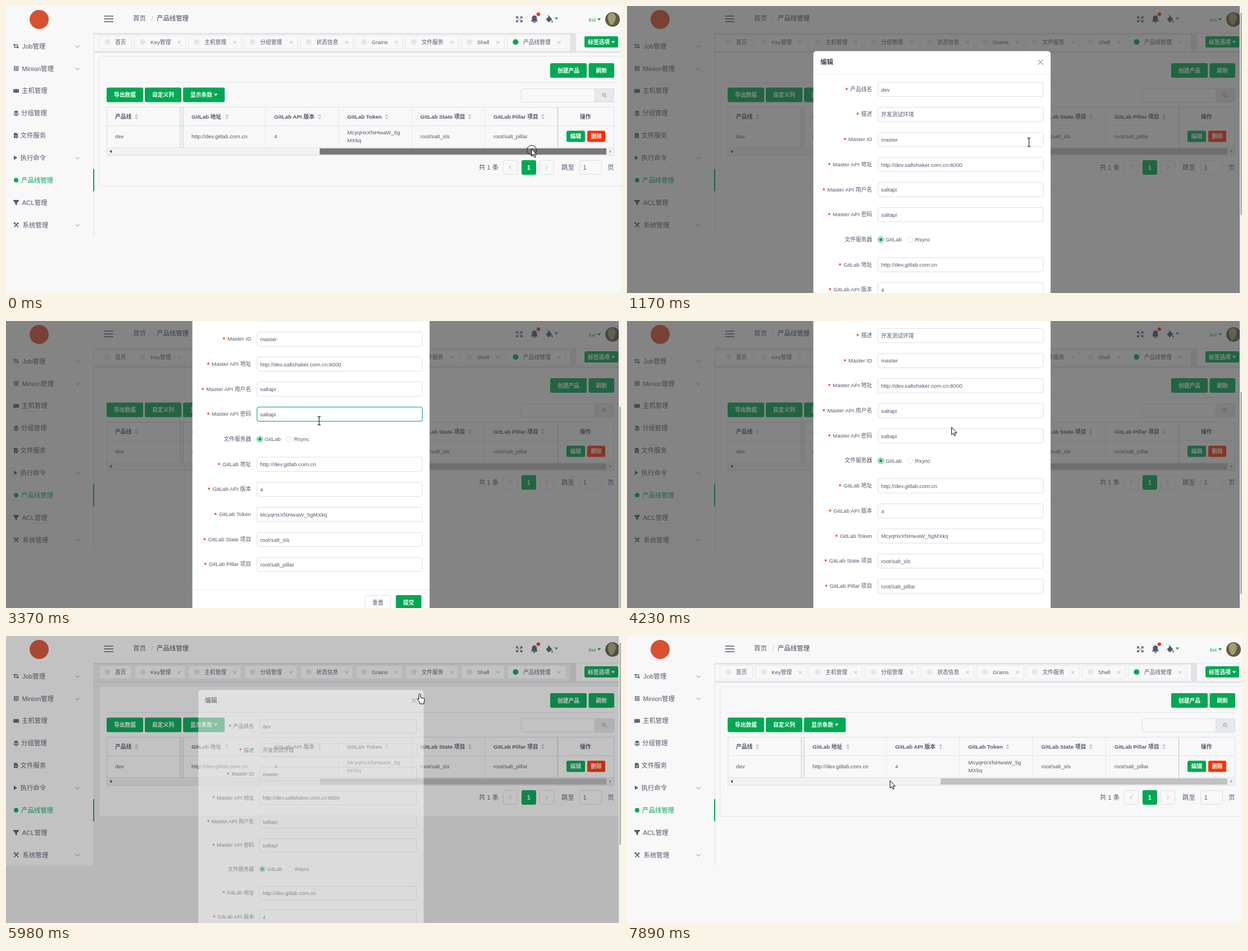
Write an HTML page that moves like this. It is 1094x512 px and loops after 8 s.

```html
<!DOCTYPE html>
<html lang="zh">
<head>
<meta charset="utf-8">
<title>产品线管理</title>
<style>
  html, body { margin: 0; width: 100%; height: 100%; overflow: hidden; background: #f8f8f8; }
  svg { display: block; width: 100%; height: 100%; }
  text { font-family: "Liberation Sans", "Noto Sans CJK SC", "Noto Sans CJK", sans-serif; white-space: pre; }
  .bg { fill: var(--bg); }
  .card { fill: var(--card); }
</style>
</head>
<body>
<svg id="stage" viewBox="0 0 1094 512" preserveAspectRatio="none"></svg>
<script>
const GREEN = '#00a854', RED = '#ff3000', INK = '#515a6e', LINE = '#dcdee2', PALE = '#c5c8ce';
const SMALL = 9.75, MID = 11.4;
const BOLD = 'font-weight="700"';

// Drawing helpers, each returns markup
const rect = (x, y, w, h, fill, more = '') =>
  `<rect x="${x}" y="${y}" width="${w}" height="${h}" ${fill ? `fill="${fill}"` : ''} ${more}/>`;
const box = (x, y, w, h, more = 'fill="none"', r = 3) =>
  rect(x, y, w, h, '', `rx="${r}" stroke="${LINE}" ${more}`);
const circle = (x, y, r, fill, more = '') => `<circle cx="${x}" cy="${y}" r="${r}" fill="${fill}" ${more}/>`;
const path = (d, fill, more = '') => `<path d="${d}" fill="${fill}" ${more}/>`;
const stroke = (d, color = INK, w = 1, more = '') =>
  path(d, 'none', `stroke="${color}" stroke-width="${w}" ${more}`);
const text = (x, mid, s, size = SMALL, fill = INK, more = '') =>
  `<text x="${x}" y="${mid + size * .37}" font-size="${size}" fill="${fill}" ${more}>${s}</text>`;
const caret = (x, y, fill) => path(`M${x - 3.2} ${y - 2}h6.4l-3.2 4z`, fill);
const cross = (x, y, r, color, w) => stroke(`M${x - r} ${y - r}l${2 * r} ${2 * r}m0 ${-2 * r}l${-2 * r} ${2 * r}`, color, w);
const button = (x, y, w, h, label, fill = GREEN, tx = x + w / 2, anchor = 'middle') =>
  rect(x, y, w, h, fill, 'rx="2.5"') +
  text(tx, y + h / 2, label, SMALL, '#fff', `${BOLD} text-anchor="${anchor}"`);

const menuY = i => 71.5 + i * 39.87;

function menuIcons() {
  const at = (i, s) => `<g transform="translate(18 ${menuY(i)})">${s}</g>`;
  let dots = '';
  for (let i = 0; i < 9; i++) dots += rect(-4 + i % 3 * 3, -4 + Math.floor(i / 3) * 3, 2.2, 2.2, INK);
  return at(0, stroke('M-4-2H4M4 2H-4', INK, 1.4) + path('M-5-2l3-2.5v5zM5 2l-3-2.5v5z', INK)) +
    at(1, dots) +
    at(2, rect(-5, -3, 10, 6.5, INK, 'rx="1"') + stroke('M-2.5-2v4.5M2.5-2v4.5', '#a9aeb8', .7)) +
    at(3, path('M0-4.5L4.5-2 0 .5-4.5-2z', INK) + stroke('M-4.3.3L0 2.5 4.3.3M-4.3 2.4L0 4.6 4.3 2.4', INK, 1.2)) +
    at(4, path('M-4-4.5H1L3.2-2V4.5H-4z', INK) + stroke('M-2.3 0h4M-2.3 2h4', '#f8f8f8', .8)) +
    at(5, path('M-4-4L2 0-4 4z', INK)) +
    at(6, circle(0, 0, 4, GREEN)) +
    at(7, path('M-5-4.5H5V-3L1.5 1v4l-3-1.5V1L-5-3z', INK)) +
    at(8, stroke('M-3.5 4L3-3M-3-3.5L4 4', INK, 1.7) + stroke('M-4.5-2.2l3-2.4M1.6-4.2l3 2.6', INK, 1.6));
}

function sidebar() {
  const items = [['Job管理', 29, 1], ['Minion管理', 28.5, 1], ['主机管理', 28], ['分组管理', 27], ['文件服务', 25.5],
    ['执行命令', 25.5, 1], ['产品线管理', 27], ['ACL管理', 28.5], ['系统管理', 29.5, 1]];
  return rect(0, 0, 156.5, 410, '', 'class="card"') + circle(59, 24, 17, '#d9502f') + menuIcons() +
    items.map(([s, x, more], i) => text(x, menuY(i), s, MID, i === 6 ? GREEN : INK) +
      (more ? stroke(`M123.5 ${menuY(i) - 1}l3.7 3.4 3.7-3.4`, '#808695') : '')).join('') +
    stroke('M156.5 48V410', LINE) + rect(155, 291, 2, 39.5, GREEN);
}

function header() {
  return rect(0, 0, 1094, 48, '', 'class="card"') +
    stroke('M174.5 18H191M174.5 23H191M174.5 28H191', INK, 1.5) +
    text(226, 22, '首页', MID) + text(258.5, 22, '/', MID, PALE) + text(268, 22, '产品线管理', MID, '#3b4252') +
    stroke('M911.5 19.2H908V22.5M914.5 19.2H918V22.5M911.5 28.3H908V25M914.5 28.3H918V25M908.5 19.7l3.2 3M917.5 19.7l-3.2 3M908.5 27.8l3.2-3M917.5 27.8l-3.2-3', INK, 1.3) +
    path('M933.5 27.5l2-2.5v-3.5q0-4 4.4-5 4.4 1 4.4 5V25l2 2.5zM937.5 28.3h5q-.5 2-2.5 2t-2.5-2z', INK) +
    circle(947, 14.6, 3.2, RED) +
    path('M960.5 23.5l5.5-5.5 5.5 5.5-5 5q-1 .7-2 0zM971 25q3 4 .8 4.6-2.6-.4-.8-4.6z', INK) +
    stroke('M964 16.5l4 4', INK, 1.2) + caret(979, 22.5, GREEN) +
    text(1037, 24, 'kvi', SMALL, GREEN) + caret(1055, 24, GREEN) +
    circle(1079, 24, 13, '#625d45') + path('M1071 17q5-7 11-3 5 5 1 13-2 6-7 7-7-8-5-17z', '#a39b72');
}

function tabBar() {
  const tabs = [[165, 59, '首页'], [228, 92, 'Key管理'], [324, 95, '主机管理'], [423, 96, '分组管理'], [523, 95, '状态信息'],
    [621.5, 85, 'Grains'], [710, 95, '文件服务'], [809, 78, 'Shell'], [891, 105, '产品线管理']];
  const edge = '#e1e4e7';
  return rect(156, 48, 938, 3, edge) + rect(156, 80, 938, 3.5, edge) + rect(1003, 48, 11, 34, edge) +
    rect(1014, 49, 80, 31.5, '', 'class="card"') +
    tabs.map(([x, w, s], i) => rect(x + .5, 52.5, w - 1, 24, '', 'class="card" rx="2" stroke="#e4e7ea"') +
      circle(x + 15.5, 64.3, 5, i === 8 ? GREEN : '#e4e6e9') + text(x + 29, 64.5, s) +
      (i ? cross(x + w - 12, 64.7, 2.6, '#a4a9b3', .9) : '')).join('') +
    button(1029, 54, 60, 20, '标签选项', GREEN, 1035, 'start') + caret(1080, 64.5, '#fff');
}

function table() {
  const cols = [[194, '产品线', 232], [330, 'GitLab 地址', 393], [477, 'GitLab API 版本', 558], [607, 'GitLab Token', 677],
    [737, 'GitLab State 项目', 825], [867, 'GitLab Pillar 项目', 955], [1021, '操作']];
  const cells = [[194, 'dev'], [330, 'http://dev.gitlab.com.cn'], [477, '4'], [737, 'root/salt_sls'], [867, 'root/salt_pillar']];
  return rect(179, 213, 903, 39, '#ebf7ff', 'id="rowHover"') +
    rect(179, 253, 903, 13, '#f1f1f1') +
    rect(558, 254, 510, 11, '', 'id="thumb"') +
    path('M184 259.5l4-3v6z', '#505050') + path('M1077 259.5l-3.5-2.7v5.4z', '#a3a3a3') +
    box(179.5, 180.5, 902, 86, 'fill="none"', 0) +
    stroke('M179 213.5H1082M179 252.5H1082', '#e1e4e8') +
    stroke('M461.5 181V252M591.5 181V252M721.5 181V252M851.5 181V252', '#e6e8eb') +
    rect(309, 181, 7, 72, '#8a8f99', 'opacity=".1"') + stroke('M309.8 181V253M315.5 181V252', '#d3d6db') +
    stroke('M981.5 181V253', '#cdd0d5', 1.4) +
    cols.map(([x, s, sort]) => text(x, 197.5, s, SMALL, INK, BOLD) +
      (sort ? path(`M${sort - 3.3} 196.4h6.6l-3.3-3.8zM${sort - 3.3} 198.4h6.6l-3.3 3.8z`, PALE) : '')).join('') +
    cells.map(([x, s]) => text(x, 232.5, s)).join('') +
    text(607, 225.5, 'McyqHxXfsHwaW_5g') + text(607, 239.5, 'MXkq') +
    button(997, 222.5, 33, 20, '编辑') + button(1034, 222.5, 32, 20, '删除', RED);
}

function content() {
  return rect(165.5, 89.5, 932, 232, '', 'class="card" rx="3" stroke="#e4e6e9"') +
    button(968, 102, 65, 26, '创建产品') + button(1036.5, 102, 45.5, 26, '刷新') +
    stroke('M179 136.5H1082', '#e4e6e9') +
    button(179, 145.5, 65, 26, '导出数据') + button(247, 145.5, 65, 26, '自定义列') +
    button(315, 145.5, 74, 26, '显示条数', GREEN, 328, 'start') + caret(373, 158.5, '#fff') +
    box(916.5, 147.5, 165, 24) + rect(1047.5, 147.5, 34, 24, '#e6e8ea', `rx="2" stroke="${LINE}"`) +
    circle(1063.6, 158.3, 2.7, 'none', 'stroke="#808695"') + stroke('M1065.6 160.5l2.4 2.6', '#808695') +
    table() +
    text(841, 288, '共 1 条', MID) + box(884.5, 275.5, 25, 25) + box(949.5, 275.5, 25, 25) +
    stroke('M898.5 284.5l-3 3.4 3 3.4M960.5 284.5l3 3.4-3 3.4', '#a4a9b3') +
    rect(917, 275, 26, 26, GREEN, 'rx="3"') + text(930, 288, '1', MID, '#fff', `${BOLD} text-anchor="middle"`) +
    text(988, 287.5, '跳至', MID) + box(1020.5, 275.5, 39, 25) + text(1026.5, 288, '1', MID) + text(1070, 287.5, '页', MID);
}

function modal() {
  const fields = [['产品线名', 'dev'], ['描述', '开发测试环境'], ['Master ID', 'master'],
    ['Master API 地址', 'http://dev.saltshaker.com.cn:8000'], ['Master API 用户名', 'saltapi'], ['Master API 密码', 'saltapi'],
    ['文件服务器'], ['GitLab 地址', 'http://dev.gitlab.com.cn'], ['GitLab API 版本', '4'],
    ['GitLab Token', 'McyqHxXfsHwaW_5gMXkq'], ['GitLab State 项目', 'root/salt_sls'], ['GitLab Pillar 项目', 'root/salt_pillar']];
  const star = `<tspan fill="${RED}" font-size="11" font-weight="700" dy="2">*</tspan><tspan dx="4" dy="-2">`;
  const rows = fields.map(([label, value], i) => {
    const y = 148.6 + i * 44.7;
    const name = text(436, y - .5, value ? `${star}${label}</tspan>` : label, SMALL, INK, 'text-anchor="end"');
    if (value) return name + box(446.5, y - 12.6, 294, 25.4) + text(452, y + .3, value);
    return name + circle(451.5, y, 5, '#fff', `stroke="${GREEN}"`) + circle(451.5, y, 3, GREEN) + text(460, y, 'GitLab') +
      circle(503.5, y, 5, '#fff', `stroke="${LINE}"`) + text(512.5, y, 'Rsync');
  }).join('');
  return rect(331.5, 80.5, 422, 650, '#fff', 'rx="5"') +
    text(344, 100, '编辑', MID, '#3b4252', BOLD) + cross(735.6, 100.3, 4.6, '#8d929c', 1.1) +
    stroke('M331.5 121.5H753.5M331.5 685.3H753.5', '#e6e8eb') + rows +
    rect(446.5, 359.5, 294, 25.4, 'none', `id="focus" rx="3" stroke="${GREEN}"`) +
    box(639, 695.5, 45, 25.5) + text(661.5, 708, '重置', SMALL, INK, 'text-anchor="middle"') +
    button(693.5, 695, 45.5, 26.5, '提交');
}

const shapes = {
  arrow: path('M0 0V13.5L3.1 10.7 5.2 15.3 7.2 14.4 5.2 10H9.3z', '#fff', 'stroke="#000"'),
  beam: stroke('M-3-7.5H-1L0-6.5 1-7.5H3M0-6.5V6.5M-3 7.5H-1L0 6.5 1 7.5H3', '#222', 1.2),
  hand: path('M-1.6 1.2Q0-1 1.6 1.2V7L8 8.5Q9 9 8.7 11L7.5 15V18H0V15.5L-4.2 10.5Q-4.5 8.5-2.8 9L-1.6 10z', '#fff', 'stroke="#000"')
};

const stage = document.getElementById('stage');
stage.innerHTML =
  rect(0, 0, 1094, 512, '', 'class="bg"') + tabBar() + header() + sidebar() + content() +
  rect(0, 0, 1094, 512, '#373737', 'id="mask"') +
  `<g id="modal">${modal()}</g>` +
  `<g id="bar">${rect(1090, 0, 4, 512, '#f1f1f1')}${rect(1091, 12.5, 3, 360, '#b4b4b4', 'id="barThumb"')}</g>` +
  `<g id="cursor">${Object.keys(shapes).map(k => `<g id="${k}">${shapes[k]}</g>`).join('')}` +
  `${circle(0, 2, 8.5, 'none', 'id="press" stroke="#222"')}</g>`;
const $ = id => document.getElementById(id);
const set = (id, attrs) => { for (const k in attrs) $(id).setAttribute(k, attrs[k]); };

const bursts = [[0, 0, 1], [150, 930, 7], [1050, 1170, 2], [1320, 2260, 7], [2380, 2380, 1], [3370, 3650, 3],
  [4080, 4930, 7], [5080, 5080, 1], [5200, 5590, 4], [5860, 5980, 2], [6140, 6800, 6], [7070, 7890, 7]];
const ticks = bursts.flatMap(([a, b, n]) =>
  Array.from({ length: n }, (_, i) => n > 1 ? Math.floor(a + (b - a) * i / (n - 1)) : a));

// Pointer track: time, x, y, shape
const track = [[0, 935, 255, 'arrow'], [150, 935, 255, 'arrow'], [410, 1010, 232, 'hand'], [800, 1010, 232, 'hand'],
  [930, 954, 236, 'arrow'], [1170, 715, 243, 'beam'], [1320, 690, 235, 'beam'],
  [1790, 557, 178, 'beam'], [3370, 557, 178, 'beam'], [3650, 557, 203, 'arrow'], [4080, 557, 203, 'arrow'],
  [4930, 680, 121, 'arrow'], [5080, 718, 110, 'arrow'], [5200, 731, 104, 'hand'], [5330, 736, 103, 'hand'],
  [5980, 736, 103, 'hand'], [6140, 732, 108, 'arrow'], [6530, 693, 160, 'arrow'], [6800, 660, 220, 'arrow'],
  [7890, 468, 258, 'arrow'], [8000, 468, 258, 'arrow']];

const within = (t, a, b) => t >= a && t < b;
const ease = (t, start, length) => {
  const s = Math.min(1, Math.max(0, (t - start) / length));
  return s * s * (3 - 2 * s);
};

function pointer(t) {
  const i = track.findIndex((k, n) => n + 1 === track.length || t < track[n + 1][0]);
  const a = track[i], b = track[i + 1] || a;
  const f = b === a ? 0 : (t - a[0]) / (b[0] - a[0]);
  return { x: a[1] + (b[1] - a[1]) * f, y: a[2] + (b[2] - a[2]) * f, shape: a[3] };
}

function render(time) {
  const t = ticks.filter(k => k <= time).pop();
  const open = ease(t, 813, 300) - ease(t, 5830, 300);
  const scroll = 206 * (ease(t, 1200, 1060) - ease(t, 3950, 980));
  const fading = open > .001 && open < .999;

  stage.style.setProperty('--bg', fading ? '#f0f0f0' : '#f8f8f8');
  stage.style.setProperty('--card', fading ? '#fff' : '#f8f8f8');
  set('mask', { opacity: .6 * open });
  set('modal', {
    opacity: open,
    transform: `translate(542.5 ${400 - scroll}) scale(${.9 + .1 * open}) translate(-542.5 -400)`
  });
  set('bar', { opacity: open > .001 ? 1 : 0 });
  set('barThumb', { y: 12.5 + scroll * .683 });
  set('focus', { opacity: ease(t, 2150, 200) - ease(t, 3400, 200) });

  const late = within(t, 7070, 7700);
  set('rowHover', { opacity: within(t, 250, 1040) || late ? 1 : 0, x: late ? 310 : 179, width: late ? 671 : 903 });
  set('thumb', { fill: t < 150 ? '#787878' : '#c1c1c1' });

  const p = pointer(t);
  set('cursor', { transform: `translate(${p.x} ${p.y})` });
  for (const k in shapes) set(k, { opacity: k === p.shape ? 1 : 0 });
  set('press', { opacity: t < 150 || within(t, 520, 780) || within(t, 5440, 5580) ? 1 : 0 });
}

const start = performance.now();
(function loop() {
  render((performance.now() - start) % 8000);
  requestAnimationFrame(loop);
})();
</script>
</body>
</html>
```
